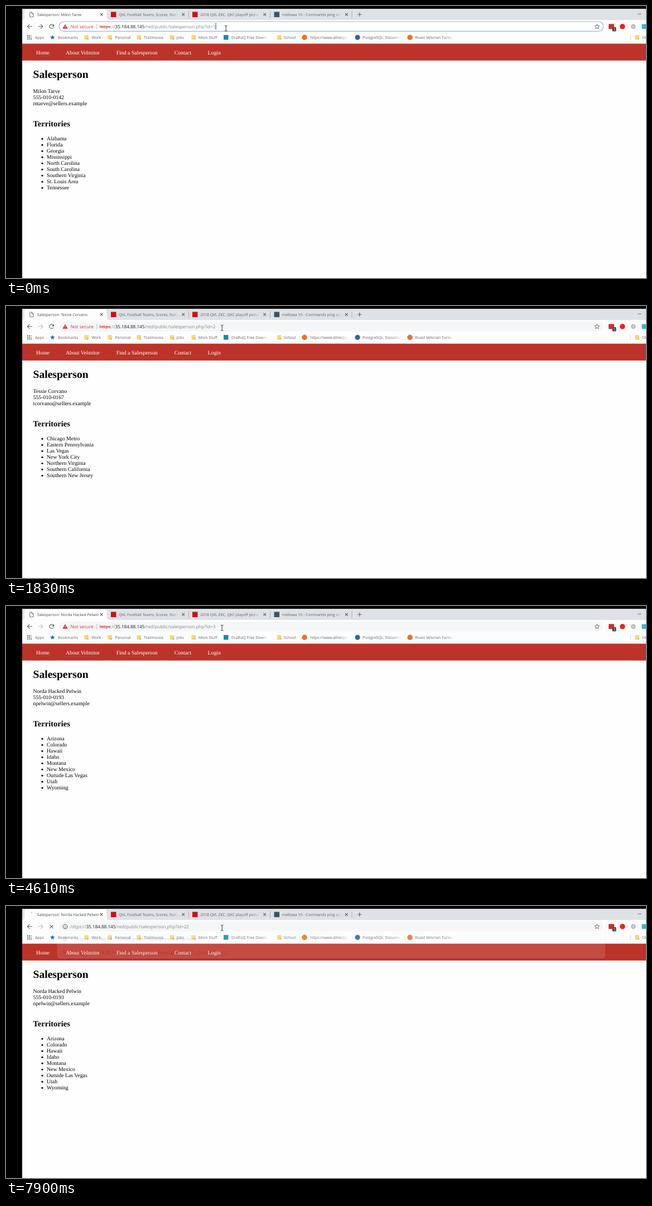
Recreate the animation shown at these times as an HTML page. Size 1147x488 px, loop 8000 ms.

```html
<!DOCTYPE html>
<html lang="en">
<head>
<meta charset="utf-8">
<title>Salesperson</title>
<style>
  html, body { margin: 0; width: 100%; height: 100%; overflow: hidden; background: #000; }
  svg { display: block; width: 100%; height: 100%; }
  text { white-space: pre; text-rendering: geometricPrecision; }
  .ui { font: 6.87px "Open Sans", "Noto Sans", sans-serif; fill: #5f6368; }
  .url { font: 8.13px "Open Sans", "Noto Sans", sans-serif; fill: #80868b; }
  .bold { font-weight: 700; fill: #0b6bd3; }
  .page { font: 9.8px "Liberation Serif", "Times New Roman", serif; }
  .h1 { font-size: 19.6px; font-weight: 700; }
  .h2 { font-size: 14.5px; font-weight: 700; }
  .line { fill: none; stroke: #5f6368; stroke-width: 1.1; }
  #popup > rect { filter: drop-shadow(0 2px 2.5px rgba(0, 0, 0, .35)); }
</style>
</head>
<body>
<svg id="stage" viewBox="0 0 1147 488" preserveAspectRatio="none"></svg>
<script>
const LOOP = 8000;
const BAR = '#dee1e6', TOOL = '#fdfdfd';

const people = [
  { name: 'Milon Tarve', phone: '555-010-0142', mail: 'mtarve@sellers.example',
    areas: ['Alabama', 'Florida', 'Georgia', 'Mississippi', 'North Carolina', 'South Carolina',
      'Southern Virginia', 'St. Louis Area', 'Tennessee'] },
  { name: 'Tessie Corvano', phone: '555-010-0167', mail: 'tcorvano@sellers.example',
    areas: ['Chicago Metro', 'Eastern Pennsylvania', 'Las Vegas', 'New York City',
      'Northern Virginia', 'Southern California', 'Southern New Jersey'] },
  { name: 'Norda Hacked Pelwin', phone: '555-010-0193', mail: 'npelwin@sellers.example',
    areas: ['Arizona', 'Colorado', 'Hawaii', 'Idaho', 'Montana', 'New Mexico',
      'Outside Las Vegas', 'Utah', 'Wyoming'] }
];

// Each step lists only what changes: [start in ms, changes]
const steps = [
  [0, { mode: 'view', id: '1', focus: 1, sel: '', caret: 1, popup: 0, spin: 0, tab: 0, page: 0, mouse: 394 }],
  [280, { mouse: 387 }],
  [430, { caret: 0 }],
  [710, { mode: 'edit', id: '', caret: 1, popup: 1 }],
  [830, { id: '2' }],
  [1260, { mode: 'load', focus: 0, caret: 0 }],
  [1410, { popup: 0, spin: 1 }],
  [1570, { spin: 2 }],
  [1710, { mode: 'view', spin: 0, tab: 1 }],
  [1830, { page: 1 }],
  [2700, { focus: 1 }],
  [2860, { sel: 'all' }],
  [3630, { sel: '', caret: 1 }],
  [3940, { mode: 'edit', id: '', popup: 1 }],
  [4060, { id: '3' }],
  [4470, { mode: 'load', focus: 0, caret: 0, popup: 0, spin: 1 }],
  [4610, { mode: 'view', spin: 0, tab: 2, page: 2 }],
  [5600, { focus: 1, sel: 'all' }],
  [5880, { sel: 'id' }],
  [7760, { mode: 'edit', id: '22', sel: '', caret: 1, popup: 1 }],
  [7900, { mode: 'load', focus: 0, caret: 0, popup: .12, spin: 1 }]
];
let last = {};
const states = steps.map(([, change]) => last = { ...last, ...change });

const rect = (x, y, w, h, fill, more = '') =>
  `<rect x="${x}" y="${y}" width="${w}" height="${h}" fill="${fill}" ${more}/>`;
const dot = (x, y, r, fill, more = '') => `<circle cx="${x}" cy="${y}" r="${r}" fill="${fill}" ${more}/>`;
const path = (d, more = '') => `<path class="line" d="${d}" ${more}/>`;
const text = (x, y, str, cls = 'ui', more = '') => `<text x="${x}" y="${y}" class="${cls}" ${more}>${str}</text>`;
const cross = (x, y, r) => path(`M${x - r} ${y - r}l${2 * r} ${2 * r}m0 ${-2 * r}l${-2 * r} ${2 * r}`);
const fade = (x, y, kind) =>
  rect(x - 14, y, 14, 12, `url(#${kind})`) + rect(x - .2, y, 7, 12, kind === 'barFade' ? BAR : TOOL);
const gradient = (id, color) => `<linearGradient id="${id}">
  <stop stop-color="${color}" stop-opacity="0"/><stop offset="1" stop-color="${color}"/></linearGradient>`;
const folder = x => rect(x - 3.6, 52.2, 7.4, 8, '#f5d67b', 'rx=".6"') + rect(x + 1, 57.6, 2.8, 2.6, '#e3b84e');

function star(x, y, r, more) {
  const points = Array.from({ length: 10 }, (_, i) => {
    const a = Math.PI * (i / 5 - .5), d = i % 2 ? r * .45 : r;
    return `${(x + d * Math.cos(a)).toFixed(2)},${(y + d * Math.sin(a)).toFixed(2)}`;
  });
  return `<polygon points="${points.join(' ')}" ${more}/>`;
}

function tabs() {
  const others = [
    [188, 'QVL Football Teams, Scores, Stats', '#d00f17'],
    [334, '2018 QVL ZKC, QKC playoff pictur', '#d00f17'],
    [480.5, 'mellowa 10 - Commands ping an', '#3b5364']
  ];
  return rect(29, 5, 1118, 20, BAR)
    + `<path d="M29 25q4 0 4-4V10q0-4 4-4H176q4.5 0 4.5 4V21q0 4 4 4z" fill="${TOOL}"/>`
    + cross(171, 15.3, 2.3)
    + others.map(([x, name, color]) =>
      rect(x, 10.5, 9.5, 9.5, color) + text(x + 14.3, 18, name) + fade(x + 122, 9, 'barFade')
      + cross(x + 129.7, 15.3, 2.3) + rect(x + 139, 9.5, .8, 12, '#9da1a6')).join('')
    + path('M630 15.3h7.4m-3.7-3.7v7.4M1132 14.3h6.5');
}

function bookmarks() {
  const folders = [[144, 'Work', 153.5], [186, 'Personal', 195.5], [238, 'Trailmoose', 247],
    [297.5, 'Jobs', 305.5], [336, 'Mom Stuff', 345], [489.5, 'School', 498], [1131, 'Other', 1140]];
  const sites = [[404, 'DraftoQ Free Downl', 471], [545, 'https://www.allrecipes', 613],
    [639, 'PostgreSQL: Documen', 708], [733, 'Roast Velorian Turkey', 802]];
  const colors = ['#e2443a', '#e2443a', '#f2a92c', '#34a853', '#3b78e7', '#f2a92c', '#34a853', '#34a853', '#3b78e7'];
  return colors.map((c, i) => rect(38 + i % 3 * 3, 52.3 + Math.floor(i / 3) * 3, 2, 2, c)).join('')
    + text(52, 59, 'Apps') + star(83.3, 56.4, 4.5, 'fill="#1a6fd8"') + text(93, 59, 'Bookmarks')
    + folders.map(([x, name, tx]) => folder(x) + text(tx, 59, name)).join('')
    + sites.map(([x, name, end]) => text(x, 59, name) + fade(end, 50, 'toolFade')).join('')
    + rect(390, 52, 8.5, 8.5, '#168aa8') + dot(535, 56.3, 4.8, '#e8742c')
    + dot(630, 56.3, 4.6, '#336791') + dot(724, 56.3, 4.8, '#e8742c')
    + rect(1118.7, 51, .8, 11, '#cfd2d5');
}

function toolbar() {
  return rect(29, 25, 1118, 42.5, TOOL)
    + path('M47 36.8H38.6M42.4 32.8l-4 4 4 4')
    + path('M57.5 36.8h8.4M62 32.8l4 4-4 4', 'id="next"')
    + `<g id="reload">${path('M84.6 34.2A3.8 3.8 0 1 0 85.2 38.1')}
        <path d="M86 32.4v4h-4z" fill="#5f6368"/></g>`
    + `<g id="stop">${cross(81.7, 36.8, 3)}</g>`
    + rect(95, 28, 975.5, 17.4, '#f5f6f7', 'id="pill" rx="8.7"')
    + rect(1080, 32.2, 10, 9, '#d92b2b', 'rx="1"') + rect(1086.5, 38, 7, 7.6, '#4a4a4a', 'rx="1"')
    + text(1088.4, 44.2, '1', 'ui', 'style="fill:#fff;font-size:6px"')
    + dot(1104.8, 36.8, 4.8, '#dd2a20') + dot(1124.3, 36.8, 3.7, '#c9cbcd', 'stroke="#8d9093" stroke-width=".8"')
    + rect(1139.5, 32.5, 9, 8.5, '#35b4d0', 'rx="1"');
}

function globe(x, y) {
  return dot(x, y, 4, '#5f6368') + `<path d="M${x - 3} ${y - 1.4}l2.4 1.4-.4 2.6M${x + .6} ${y - 3}l-.4 1.6 2.4 1.2-1 2"
    fill="none" stroke="#f7f9f9" stroke-width="1"/>`;
}

function popup() {
  return `<g id="popup">${rect(91.5, 26.5, 982.5, 67.8, '#f7f9f9', 'rx="5"')}
    ${globe(106, 59.3)}${text(122.7, 62.3, '', 'url bold', 'id="hit"')}
    ${dot(105.2, 82.2, 2.3, 'none', 'class="line"')}${path('M107 84l2.8 2.8')}
    <text class="url" x="122.7" y="85.8"><tspan id="query" fill="#3c4043"></tspan><tspan fill="#757a80"> - Quovia Search</tspan></text></g>`;
}

function omnibox() {
  return `<g id="warn"><path d="M106 32.6l4.7 8.2h-9.4z" fill="#c8342a"/>
      ${rect(105.5, 35.4, 1, 2.7, '#fff')}${rect(105.5, 38.8, 1, 1, '#fff')}
      ${text(115.7, 40, 'Not secure', 'url', 'style="fill:#c8342a"')}${rect(162, 32, .8, 10, '#b9bcbf')}</g>
    <g id="info">${dot(106, 36.8, 3.8, 'none', 'class="line"')}${path('M106 36.2v2.8M106 34.2v1.1')}</g>
    <g id="globe">${globe(106, 36.8)}</g>
    <rect id="mark" y="30" height="14" fill="#0078d7"/>
    <text id="url" class="url" y="40"></text>
    <rect id="caret" y="30.5" width=".9" height="12" fill="#222"/>
    ${star(1059.3, 37, 4.4, 'id="fav" class="line" style="stroke-width:.9"')}`;
}

function site() {
  const links = [[54, 'Home'], [107, 'About Velmitor'], [197.7, 'Find a Salesperson'], [301.7, 'Contact'], [361.5, 'Login']];
  return rect(29, 67.3, 1118, 421, '#fefefe') + rect(29, 67.3, 1118, 30.5, '#bc3329')
    + links.map(([x, name]) => text(x, 86.5, name, 'page', 'fill="#fff"')).join('')
    + text(48.5, 129, 'Salesperson', 'page h1') + text(48.5, 216, 'Territories', 'page h2')
    + '<g id="person"></g>';
}

const $ = id => document.getElementById(id);
$('stage').innerHTML = `<defs>${gradient('barFade', BAR)}${gradient('toolFade', TOOL)}</defs>`
  + rect(0, 0, 1147, 488, '#000') + site() + tabs()
  + text(55.7, 18, '', 'ui', 'id="tab" style="fill:#45494d"')
  + `<path id="doc" class="line" style="stroke-width:.9" d="M42.8 11.2h3.6l2.5 2.5v6h-6.1zM46.2 11.2v2.7h2.7"/>`
  + path('', 'id="spin"')
  + toolbar() + bookmarks() + popup() + omnibox()
  + path('M385 34.2q2 0 2.2 1.2q.2-1.2 2.2-1.2M387.2 35v8.4M385 44.2q2 0 2.2-1.2q.2 1.2 2.2 1.2',
    'id="mouse" style="stroke:#222;stroke-width:.9"');

const show = (id, on) => $(id).setAttribute('visibility', on ? 'visible' : 'hidden');
const set = (id, attrs) => Object.entries(attrs).forEach(([k, v]) => $(id).setAttribute(k, v));
const HOST = '35.184.88.145', PAGE = '/red/public/salesperson.php?id=';

function drawPerson({ name, phone, mail, areas }) {
  $('person').innerHTML = [name, phone, mail].map((s, i) => text(48.5, 156 + i * 11, s, 'page')).join('')
    + areas.map((s, i) => dot(65, 238.3 + i * 11, 1.6, '#000') + text(73, 241 + i * 11, s, 'page')).join('');
}

function drawUrl(s) {
  const x = { view: 167.7, edit: 122.7, load: 115.7 }[s.mode];
  const view = s.mode === 'view', all = s.sel === 'all';
  const span = (str, color, more = '') => `<tspan fill="${color}" ${more}>${str}</tspan>`;
  const grey = all ? '#fff' : '#80868b';
  const scheme = view
    ? span('https', all ? '#fff' : '#c8342a', 'text-decoration="line-through"') + span('://', grey)
    : span('https://', grey);
  $('url').innerHTML = scheme + span(HOST, all ? '#fff' : '#202124') + span(PAGE, grey)
    + span(s.id, s.sel ? '#fff' : '#80868b');
  set('url', { x });
  const width = $('url').getComputedTextLength();
  const from = s.sel === 'id' ? width - s.id.length * 4.65 - .5 : 0;
  set('mark', { x: x + from, width: width - from + .6 });
  set('caret', { x: x + width + .2 });
  show('mark', s.sel);
  show('caret', s.caret);
}

function draw(s) {
  const { mode } = s, full = 'https://' + HOST + PAGE + s.id;
  drawUrl(s);
  drawPerson(people[s.page]);
  $('tab').textContent = 'Salesperson: ' + people[s.tab].name;
  $('hit').textContent = $('query').textContent = full;
  show('warn', mode === 'view');
  show('globe', mode === 'edit');
  show('info', mode === 'load');
  show('stop', mode === 'load');
  show('reload', mode !== 'load');
  show('doc', mode !== 'load');
  show('fav', mode !== 'edit');
  set('spin', { d: ['', 'M45.4 11.6h1', 'M42 15.6q.2-3 3-3.6'][s.spin] });
  set('popup', { opacity: s.popup });
  set('pill', s.focus
    ? { fill: '#fff', stroke: '#8fb6ea', 'stroke-width': 1.2 }
    : { fill: '#f5f6f7', stroke: 'none' });
  $('next').style.stroke = s.tab ? '#bfc2c5' : '#5f6368';
  set('mouse', { transform: `translate(${s.mouse - 387} ${s.mouse > 390 ? 1 : 0})` });
}

const start = performance.now();
let shown = -1;
function tick() {
  const t = (performance.now() - start) % LOOP;
  const now = steps.findLastIndex(([at]) => at <= t);
  if (now !== shown) draw(states[shown = now]);
  requestAnimationFrame(tick);
}
tick();
</script>
</body>
</html>
```
